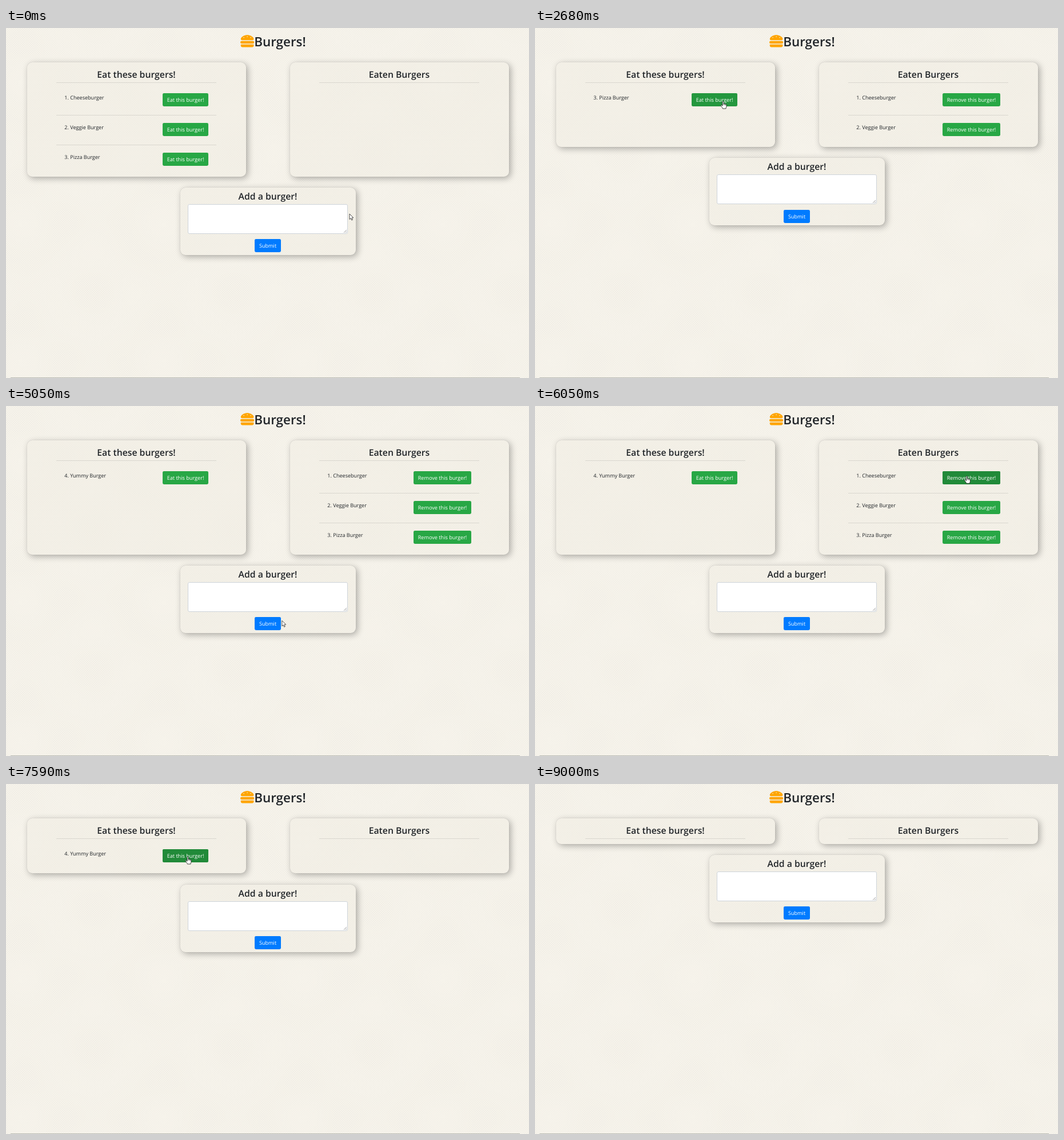
Write an HTML page with a canvas that moves like this. It is 915x612 px and loops after 9080 ms.

```html
<!DOCTYPE html>
<html lang="en">
<head>
<meta charset="utf-8">
<title>Burgers!</title>
<style>
  html, body { margin: 0; width: 100%; height: 100%; overflow: hidden; background: #f6f3eb; }
  #stage { position: relative; width: 915px; height: 612px; overflow: hidden; }
  #paper, #ui { position: absolute; left: 0; top: 0; }
  .panel {
    position: absolute; border-radius: 9px; background: rgba(241, 238, 227, .5);
    box-shadow: 3px 3px 12px rgba(0, 0, 0, .3), 0 0 1px rgba(0, 0, 0, .25);
  }
  text { font-family: "Open Sans", "Noto Sans", sans-serif; text-rendering: geometricPrecision; fill: #212529; }
  .title { font-size: 22.4px; font-weight: 600; }
  .head { font-size: 15.75px; font-weight: 600; text-anchor: middle; }
  .item { font-size: 9.05px; }
  .label { font-size: 9.13px; fill: #fff; text-anchor: middle; }
  .typed { font-size: 9.13px; fill: #495057; }
</style>
</head>
<body>
<div id="stage">
  <canvas id="paper" width="915" height="612"></canvas>
  <div class="panel" id="left"></div>
  <div class="panel" id="right"></div>
  <div class="panel" id="add"></div>
  <svg id="ui" width="915" height="612" viewBox="0 0 915 612"></svg>
</div>
<script>
const LOOP = 9080, TOP = 60.3, ROW = 51.6, MIDDLE = 458, OFFSET = 230;
const FADE = 150, RELOAD = 120, PACE = 3.2;
const $ = id => document.getElementById(id);
const clamp = (v, lo, hi) => Math.max(lo, Math.min(hi, v));
const names = ['Cheeseburger', 'Veggie Burger', 'Pizza Burger', 'Yummy Burger'];

const visit = (on, arrive, press, x, y) => ({ on, arrive, press, x, y });
const visits = [
  visit('start', 0, -40, 601, 325),
  visit('left', 1080, 1220, 340, 121),
  visit('left', 2400, 2490, 329, 128),
  visit('left', 2900, 3000, 329, 128),
  visit('area', 3640, 3690, 440, 326),
  visit('add', 4870, 4925, 480, 378),
  visit('right', 6080, 6220, 756, 122),
  visit('right', 6640, 6700, 748, 124),
  visit('right', 7140, 7240, 748, 126),
  visit('left', 7500, 7790, 318, 127),
  visit('right', 8330, 8430, 756, 126),
  visit('exit', 8960, LOOP, 886, 376)
];
const clickOn = name => visits.find(v => v.on === name).press;
const typing = { from: clickOn('area') + 150, to: clickOn('add') - 400 };

// Every click on a button loads a page with changed lists.
function buildPages() {
  let left = [0, 1, 2], right = [];
  const list = [{ start: 0, left, right }];
  for (const { on, press } of visits) {
    if (on === 'left') [left, right] = [left.slice(1), [...right, left[0]]];
    else if (on === 'right') right = right.slice(1);
    else if (on === 'add') left = [...left, 3];
    else continue;
    list.push({ start: press + RELOAD, left, right });
  }
  return list;
}
const pages = buildPages();

function pointer(t) {
  const i = visits.findIndex(v => v.arrive > t);
  if (i < 0) return t < 8990 ? visits[visits.length - 1] : null;
  const a = visits[i - 1], b = visits[i];
  const room = b.arrive - a.press - 60;
  const time = Math.min(room, PACE * Math.hypot(b.x - a.x, b.y - a.y)) || 1;
  const k = clamp(1 - (b.arrive - t) / time, 0, 1), e = k * k * (3 - 2 * k);
  return { x: a.x + (b.x - a.x) * e, y: a.y + (b.y - a.y) * e };
}

const box = (x, y, w, h) => ({ x: Math.round(x), y: Math.round(y), w, h });
const inside = (p, b) => p && p.x >= b.x && p.x <= b.x + b.w && p.y >= b.y && p.y <= b.y + b.h;

function layout(page) {
  const height = 44.6 + ROW * Math.max(page.left.length, page.right.length);
  const addY = TOP + height + 19;
  const rows = (on, x, w) => page[on].map((n, row) => ({ ...box(x, 114.4 + ROW * row, w, 23), n, row, on }));
  return {
    height, addY,
    area: box(318, addY + 29.3, 280, 52),
    buttons: [
      ...rows('left', 274, 80),
      ...rows('right', 713, 101),
      { ...box(435, addY + 90.4, 46, 23), row: 0, on: 'add' }
    ]
  };
}

// Share of the colour fade that hovering has covered since the page loaded.
function hoverShare(t, b, loaded) {
  const steps = 10;
  let on = 0;
  for (let k = 0; k < steps; k++) {
    const s = t - k * FADE / steps;
    if (s > loaded && inside(pointer(s), b)) on++;
  }
  return on / steps;
}

const text = (cls, x, y, s) => `<text class="${cls}" x="${x}" y="${y}">${s}</text>`;
const rect = (b, fill, more = '') =>
  `<rect x="${b.x}" y="${b.y}" width="${b.w}" height="${b.h}" fill="${fill}" ${more}/>`;
const grow = (b, d) => ({ x: b.x - d, y: b.y - d, w: b.w + 2 * d, h: b.h + 2 * d });
const rule = (on, y) => rect(box(on === 'left' ? 88 : 548, y, 280, 1), 'rgba(0,0,0,.1)');
const ring = (b, color) => rect(grow(b, .9), 'none', `rx="3.2" stroke="${color}" stroke-width="1.9"`);

const styles = {
  left: { label: 'Eat this burger!', base: '#28a745', hover: '#218838', down: '#1e7e34', glow: 'rgba(72,180,97,.5)' },
  add: { label: 'Submit', base: '#007bff', hover: '#0069d9', down: '#0062cc', glow: 'rgba(38,143,255,.5)' }
};
styles.right = { ...styles.left, label: 'Remove this burger!' };

function button(b, t, loaded) {
  const s = styles[b.on];
  const down = !b.row && visits.some(v => v.on === b.on && t >= v.press && t < v.press + RELOAD);
  const face = rect(b, down ? s.down : s.base, 'rx="2.4"');
  const shade = down ? ring(b, s.glow) : rect(b, s.hover, `rx="2.4" opacity="${hoverShare(t, b, loaded)}"`);
  return face + shade + text('label', b.x + b.w / 2, b.y + 15.2, s.label);
}

function item(b) {
  return text('item', b.on === 'left' ? 102.3 : 562.3, b.y + 11.2, `${b.n + 1}. ${names[b.n]}`) +
    (b.row ? rule(b.on, b.y - 14.3) : '');
}

function textarea(a, t, loaded) {
  const focus = t >= clickOn('area') && t < clickOn('add');
  const filled = loaded < typing.from ? clamp((t - typing.from) / (typing.to - typing.from), 0, 1) : 0;
  const typed = names[3].slice(0, Math.floor(filled * names[3].length));
  const caret = focus && !typed && (t - clickOn('area')) % 1000 < 500;
  const right = a.x + a.w, bottom = a.y + a.h;
  return (focus ? ring(a, 'rgba(0,123,255,.25)') : '') +
    rect(grow(a, -.5), '#fff', `rx="2.4" stroke="${focus ? '#80bdff' : '#ced4da'}"`) +
    `<path d="M${right - 7} ${bottom - 2}l5-5m-2 5l2-2" stroke="#777" stroke-width=".7"/>` +
    text('typed', a.x + 8, a.y + 14.8, typed) +
    (caret ? rect(box(a.x + 8, a.y + 6, 1, 11), '#333') : '');
}

const seed = (x, y) => `<circle cx="${x}" cy="${y}" r="17" fill="#f6f3eb"/>`;
const burger = `<g transform="translate(410 10.7) scale(.0473)" fill="#ffa500">
  <path d="M58 224H454C489 224 508 180 488 148C448 83 360 32 256 32S64 83 24 148C4 180 24 224 58 224Z"/>
  <rect y="256" width="512" height="96" rx="48"/>
  <path d="M32 384H480a16 16 0 0 1 16 16v16a64 64 0 0 1-64 64H80a64 64 0 0 1-64-64v-16a16 16 0 0 1 16-16Z"/>
  ${seed(128, 128)}${seed(256, 96)}${seed(384, 128)}</g>`;

const shapes = {
  arrow: '<path d="M0 0V9.6L2.2 7.6L3.8 11L5.4 10.3L3.9 7L6.8 6.8Z" fill="#fff" stroke="#222" stroke-width=".8"/>',
  hand: `<path d="M-1 1C-1 -.3 1 -.3 1 1V4.6C1.4 4 2.6 4.1 2.8 4.9C3.4 4.4 4.3 4.6 4.5 5.4C5.2 5 6 5.4 6 6.3V9
    C6 10.5 5 11 5 13H-.6C-.8 11.2-2.6 9.8-3.9 7.8C-4.4 6.7-3 6-2.2 7L-1 8.2Z" fill="#fff" stroke="#111" stroke-width=".8"/>
    <path d="M1 4.6V7M2.8 5V7.2M4.5 5.5V7.4" stroke="#111" stroke-width=".6"/>`,
  beam: '<path d="M-2-5H2M0-5V5M-2 5H2" fill="none" stroke="#222" stroke-width=".8"/>'
};

function cursor(p, view) {
  if (!p) return '';
  const kind = view.buttons.some(b => inside(p, b)) ? 'hand' : inside(p, view.area) ? 'beam' : 'arrow';
  return `<g transform="translate(${p.x} ${p.y})">${shapes[kind]}</g>`;
}

function place(id, center, y, w, h) {
  const px = { left: center - w / 2, top: y, width: w, height: h };
  for (const key in px) $(id).style[key] = px[key] + 'px';
}

function draw(t) {
  const page = pages.filter(p => p.start <= t).pop(), view = layout(page);
  place('left', MIDDLE - OFFSET, TOP, 383, view.height);
  place('right', MIDDLE + OFFSET, TOP, 383, view.height);
  place('add', MIDDLE, view.addY, 307, 118);
  $('ui').innerHTML = burger +
    text('title', 434.2, 31.8, 'Burgers!') +
    text('head', MIDDLE - OFFSET, 86.9, 'Eat these burgers!') + rule('left', 94.7) +
    text('head', MIDDLE + OFFSET, 86.9, 'Eaten Burgers') + rule('right', 94.7) +
    text('head', MIDDLE, view.addY + 21.2, 'Add a burger!') +
    view.buttons.filter(b => b.on !== 'add').map(item).join('') +
    textarea(view.area, t, page.start) +
    view.buttons.map(b => button(b, t, page.start)).join('') +
    rect(box(8, 611, 891, 1), '#b9bab3') +
    cursor(pointer(t), view);
}

// Faint woven paper with soft patches.
function paintPaper() {
  const c = $('paper').getContext('2d');
  c.fillStyle = '#f6f3eb';
  c.fillRect(0, 0, 915, 612);
  const wave = 2 * Math.PI / 245;
  for (let y = 0; y < 612; y += 2) {
    for (let x = y % 4; x < 915; x += 4) {
      const patch = Math.sin(x * wave + 1) * Math.sin(y * wave * 2) + Math.sin(x * wave * 2) * Math.sin(y * wave + 2);
      c.fillStyle = `rgba(110,105,85,${(.045 + .015 * patch).toFixed(3)})`;
      c.fillRect(x, y, 1.4, 1.4);
    }
  }
}

paintPaper();
const start = performance.now();
function tick() {
  draw((performance.now() - start) % LOOP);
  requestAnimationFrame(tick);
}
tick();
</script>
</body>
</html>
```
